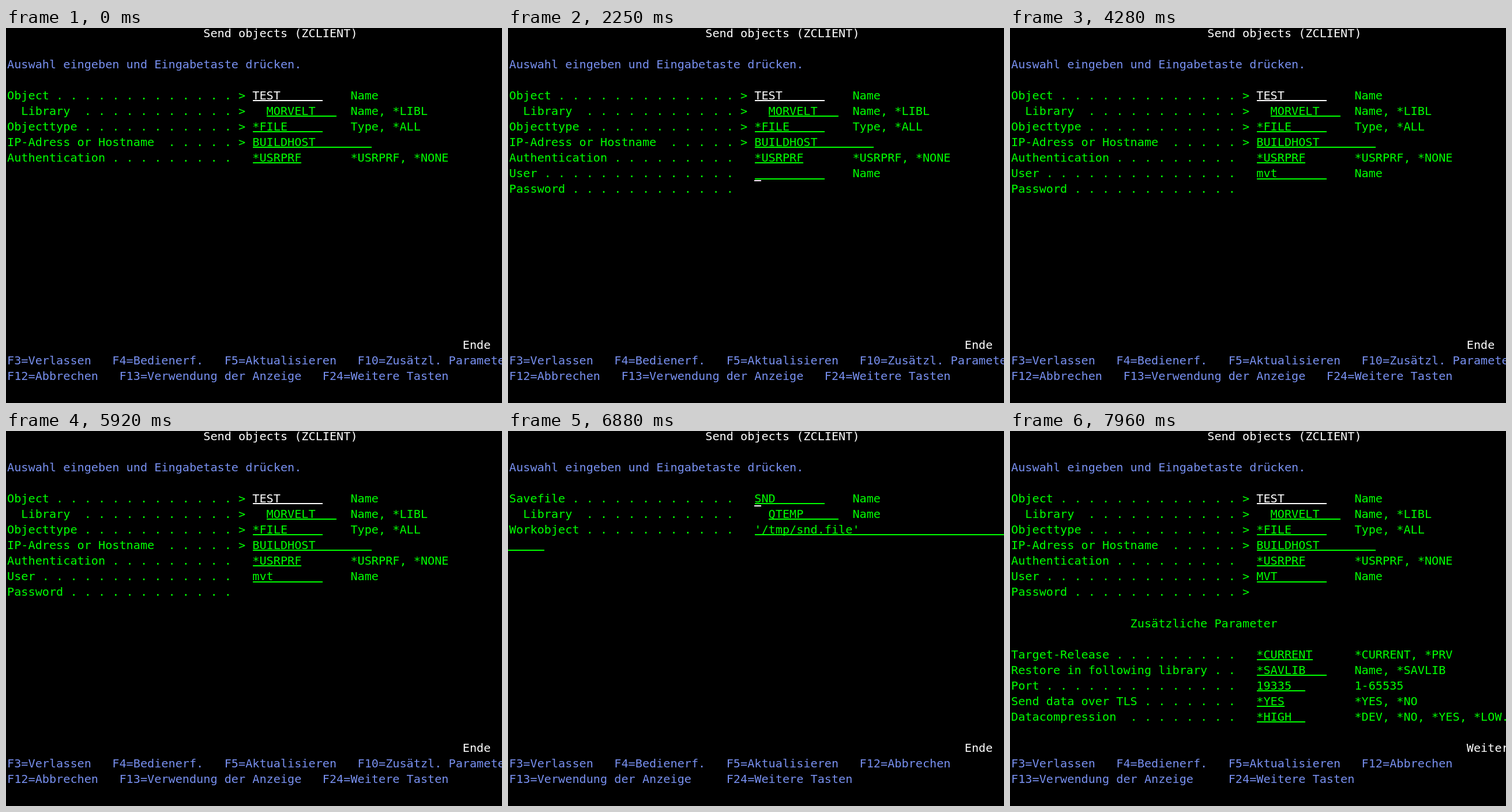
Recreate the animation shown at these times as an HTML page with a canvas. Size 860 px wide and 651 px high, loop 8 s.

```html
<!DOCTYPE html>
<html lang="de">
<head>
<meta charset="utf-8">
<title>Send objects</title>
<style>
  html, body { margin: 0; width: 100%; height: 100%; overflow: hidden; background: #000; }
  canvas { display: block; }
</style>
</head>
<body>
<canvas id="screen" width="860" height="651"></canvas>
<script>
const ctx = document.getElementById('screen').getContext('2d');
const LOOP = 8000, CELL = 12.15, LEFT = 2.05, PITCH = 27.06;
const GREEN = '#00ff00', BLUE = '#7890f0', WHITE = '#ffffff';
const FIELD = 35, HINT = 49;

const colX = col => LEFT + col * CELL;

function print(row, col, text, color = GREEN) {
  ctx.fillStyle = color;
  const y = Math.round(15.8 + row * PITCH);
  [...text].forEach((char, i) => ctx.fillText(char, colX(col + i), y));
}

function underline(row, from, to, color = GREEN) {
  const x = Math.round(from);
  ctx.fillStyle = color;
  ctx.fillRect(x, Math.round(17 + row * PITCH), Math.round(to) - x, 2);
}

// A labelled input: dot leader, optional ">" mark, underlined value, hint.
function field(row, label, { value = '', size = 0, hint = '', mark = '', col = FIELD, color = GREEN }) {
  print(row, 0, label);
  for (let dot = (label.length + 1) | 1; dot < 32; dot += 2) print(row, dot, '.');
  print(row, 33, mark);
  print(row, col, value, color);
  if (size) underline(row, colX(col) + 0.7, colX(col + size), color);
  print(row, HINT, hint);
}

function frame(end, keys) {
  print(0, 28, 'Send objects (ZCLIENT)', WHITE);
  print(2, 0, 'Auswahl eingeben und Eingabetaste drücken.', BLUE);
  print(20, 65, end, WHITE);
  keys.forEach((line, i) => print(21 + i, 0, line, BLUE));
}

const FIRST_KEYS = [
  'F3=Verlassen   F4=Bedienerf.   F5=Aktualisieren   F10=Zusätzl. Parameter',
  'F12=Abbrechen   F13=Verwendung der Anzeige   F24=Weitere Tasten'];
const MORE_KEYS = [
  'F3=Verlassen   F4=Bedienerf.   F5=Aktualisieren   F12=Abbrechen',
  'F13=Verwendung der Anzeige     F24=Weitere Tasten'];

function objectFields() {
  const mark = '>';
  field(4, 'Object', { mark, value: 'TEST', size: 10, hint: 'Name', color: WHITE });
  field(5, '  Library', { mark, value: 'MORVELT', size: 10, hint: 'Name, *LIBL', col: 37 });
  field(6, 'Objecttype', { mark, value: '*FILE', size: 10, hint: 'Type, *ALL' });
  field(7, 'IP-Adress or Hostname', { mark, value: 'BUILDHOST', size: 17 });
  field(8, 'Authentication', { value: '*USRPRF', size: 7, hint: '*USRPRF, *NONE' });
}

function loginFields(user, mark) {
  field(9, 'User', { mark, value: user, size: 10, hint: 'Name' });
  field(10, 'Password', { mark });
}

function start() {
  frame('Ende', FIRST_KEYS);
  objectFields();
}

function login(t) {
  start();
  const typed = [3200, 3270, 3500].filter(key => t >= key).length;
  loginFields('mvt'.slice(0, typed));
}

function parameters() {
  frame('Weiter...', MORE_KEYS);
  objectFields();
  loginFields('MVT', '>');
  print(12, 17, 'Zusätzliche Parameter');
  field(14, 'Target-Release', { value: '*CURRENT', size: 8, hint: '*CURRENT, *PRV' });
  field(15, 'Restore in following library', { value: '*SAVLIB', size: 10, hint: 'Name, *SAVLIB' });
  field(16, 'Port', { value: '19335', size: 7, hint: '1-65535' });
  field(17, 'Send data over TLS', { value: '*YES', size: 4, hint: '*YES, *NO' });
  field(18, 'Datacompression', { value: '*HIGH', size: 7, hint: '*DEV, *NO, *YES, *LOW...' });
}

function saveFile() {
  frame('Ende', MORE_KEYS);
  field(4, 'Savefile', { value: 'SND', size: 10, hint: 'Name' });
  field(5, '  Library', { value: 'QTEMP', size: 10, hint: 'Name', col: 37 });
  field(6, 'Workobject', { value: "'/tmp/snd.file'", size: 36 });
  underline(7, 0, colX(5));
}

const PAGES = [[0, start], [2250, login], [6240, parameters], [6880, saveFile], [7410, parameters]];

// Time, row and column of the cursor; no row means it is blinked off.
const CURSOR = [
  [0], [390, 8, 35], [940], [1400, 8, 35], [1720, 4, 35], [2250, 9, 35], [2810],
  [3200, 9, 36], [3270, 9, 37], [3500, 9, 38], [3730, 10, 35], [4280], [4370, 10, 37],
  [4610, 10, 38], [4750, 10, 39], [4840, 10, 40], [4990, 10, 41], [5220, 10, 42],
  [5390, 10, 43], [5920], [6240, 4, 35], [6790], [6880, 4, 35], [7960]];

const latest = (steps, t) => steps.findLast(([time]) => t >= time);

function draw() {
  const t = performance.now() % LOOP;
  ctx.fillStyle = '#000';
  ctx.fillRect(0, 0, 860, 651);
  ctx.font = '20.18px "DejaVu Sans Mono", monospace';
  latest(PAGES, t)[1](t);
  const [, row, col] = latest(CURSOR, t);
  if (row) {
    const x = Math.round(colX(col));
    ctx.fillStyle = WHITE;
    ctx.fillRect(x, 21 + row * 27, Math.round(colX(col + 1)) - x, 2);
  }
  requestAnimationFrame(draw);
}
draw();
</script>
</body>
</html>
```
